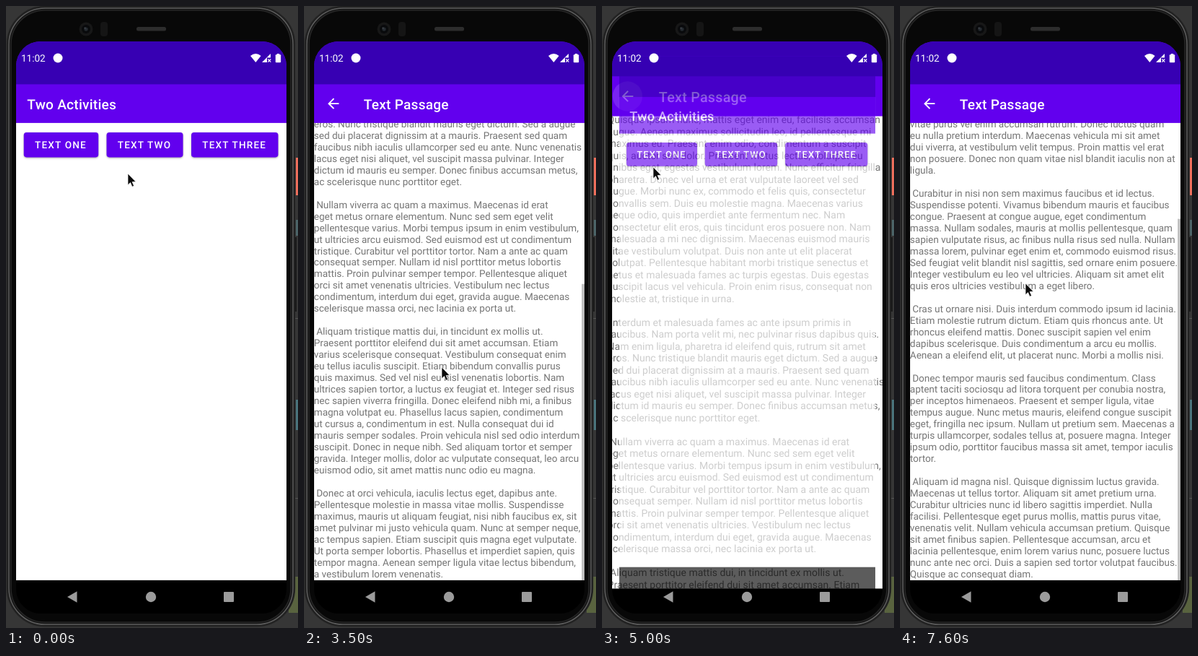
An HTML page with a canvas for the animation above (8 s loop, 405 px wide and 861 px high).

```html
<!DOCTYPE html>
<html lang="en">
<head>
<meta charset="utf-8">
<title>Two Activities</title>
<style>
html, body { margin: 0; width: 100%; height: 100%; overflow: hidden; background: #363636; }
canvas { display: block; width: 405px; height: 861px; }
</style>
</head>
<body>
<canvas id="stage"></canvas>
<script>
const W = 405, H = 861, LOOP = 8000, STEP = 100;
const SCREEN = { x: 14, y: 49, w: 375, h: 792 };
const MID = { x: 201.5, y: 445 };
// Device pixels to stage pixels, and the layout that follows
const PX = 375 / 1080, DP = 2.75 * PX;
const BAR = 108.4, TOP = 161.9, BOTTOM = 794.9;
const SMALL = 39 * PX, LARGE = 55 * PX, LINE = 46 * PX;
const FONT = 'Roboto, "Open Sans", sans-serif';
const DARK = '#3700b3', PURPLE = '#6200ee';

const passageOne = `Lorem ipsum dolor sit amet, consectetur adipiscing elit.
Quisque ipsum nunc, mattis eget enim eu, facilisis accumsan
augue. Aenean maximus sollicitudin leo, id pellentesque mi
maximus eu. Praesent enim odio, condimentum a suscipit
quis, auctor sed dolor. Praesent metus lectus, volutpat eu
finibus eget, egestas vestibulum lorem. Nunc efficitur fringilla
pharetra. Donec vel urna et erat vulputate laoreet vel sed
augue. Morbi nunc ex, commodo et felis quis, consectetur
convallis sem. Duis eu molestie magna. Maecenas varius
neque odio, quis imperdiet ante fermentum nec. Nam
consectetur elit eros, quis tincidunt eros posuere non. Nam
malesuada a mi nec dignissim. Maecenas euismod mauris
vitae vestibulum volutpat. Duis non ante ut elit placerat
volutpat. Pellentesque habitant morbi tristique senectus et
netus et malesuada fames ac turpis egestas. Duis egestas
suscipit lacus vel vehicula. Proin enim risus, consequat non
molestie at, tristique in urna.

 Interdum et malesuada fames ac ante ipsum primis in
faucibus. Nam porta velit mi, nec pulvinar risus dapibus quis.
Nam enim ligula, pharetra id eleifend quis, rutrum sit amet
eros. Nunc tristique blandit mauris eget dictum. Sed a augue
sed dui placerat dignissim at a mauris. Praesent sed quam
faucibus nibh iaculis ullamcorper sed eu ante. Nunc venenatis
lacus eget nisi aliquet, vel suscipit massa pulvinar. Integer
dictum id mauris eu semper. Donec finibus accumsan metus,
ac scelerisque nunc porttitor eget.

 Nullam viverra ac quam a maximus. Maecenas id erat
eget metus ornare elementum. Nunc sed sem eget velit
pellentesque varius. Morbi tempus ipsum in enim vestibulum,
ut ultricies arcu euismod. Sed euismod est ut condimentum
tristique. Curabitur vel porttitor tortor. Nam a ante ac quam
consequat semper. Nullam id nisl porttitor metus lobortis
mattis. Proin pulvinar semper tempor. Pellentesque aliquet
orci sit amet venenatis ultricies. Vestibulum nec lectus
condimentum, interdum dui eget, gravida augue. Maecenas
scelerisque massa orci, nec lacinia ex porta ut.

 Aliquam tristique mattis dui, in tincidunt ex mollis ut.
Praesent porttitor eleifend dui sit amet accumsan. Etiam
varius scelerisque consequat. Vestibulum consequat enim
eu tellus iaculis suscipit. Etiam bibendum convallis purus
quis maximus. Sed vel nisl eu nisl venenatis lobortis. Nam
ultrices sapien tortor, a luctus ex feugiat et. Integer sed risus
nec sapien viverra fringilla. Donec eleifend nibh mi, a finibus
magna volutpat eu. Phasellus lacus sapien, condimentum
ut cursus a, condimentum in est. Nulla consequat dui id
mauris semper sodales. Proin vehicula nisl sed odio interdum
suscipit. Donec in neque nibh. Sed aliquam tortor et semper
gravida. Integer mollis, dolor ac vulputate consequat, leo arcu
euismod odio, sit amet mattis nunc odio eu magna.

 Donec at orci vehicula, iaculis lectus eget, dapibus ante.
Pellentesque molestie in massa vitae mollis. Suspendisse
maximus, mauris ut aliquam feugiat, nisi nibh faucibus ex, sit
amet pulvinar mi justo vehicula quam. Nunc at semper neque,
ac tempus sapien. Etiam suscipit quis magna eget vulputate.
Ut porta semper lobortis. Phasellus et imperdiet sapien, quis
tempor magna. Aenean semper ligula vitae lectus bibendum,
a vestibulum lorem venenatis.`.split('\n');

const passageTwo = `Lorem ipsum dolor sit amet, consectetur adipiscing elit. Sed
ac sem neque. Pellentesque tempus sollicitudin elementum.
Vestibulum eros turpis, varius eu finibus sit amet, aliquet
a nulla. Pellentesque scelerisque metus nec eros faucibus
pulvinar. Phasellus aliquam tincidunt suscipit. Proin
ullamcorper ligula nibh, ac fringilla massa placerat sit amet.
Praesent molestie iaculis libero in egestas. Curabitur vitae
dignissim ligula. Nullam tincidunt eros vitae egestas tincidunt.
Praesent porttitor dolor vitae ligula tincidunt, vitae lobortis
orci viverra. Aenean fermentum malesuada vestibulum. Etiam
vitae purus vel enim accumsan rutrum. Donec luctus quam
eu nulla pretium interdum. Maecenas vehicula mi sit amet
dui viverra, at vestibulum velit tempus. Proin mattis vel erat
non posuere. Donec non quam vitae nisl blandit iaculis non at
ligula.

 Curabitur in nisi non sem maximus faucibus et id lectus.
Suspendisse potenti. Vivamus bibendum mauris et faucibus
congue. Praesent at congue augue, eget condimentum
massa. Nullam sodales, mauris at mollis pellentesque, quam
sapien vulputate risus, ac finibus nulla risus sed nulla. Nullam
massa lorem, pulvinar eget enim et, commodo euismod risus.
Sed feugiat velit blandit nisl sagittis, sed ornare enim posuere.
Integer vestibulum eu leo vel ultricies. Aliquam sit amet elit
quis eros ultricies vestibulum a eget libero.

 Cras ut ornare nisi. Duis interdum commodo ipsum id lacinia.
Etiam molestie rutrum dictum. Etiam quis rhoncus ante. Ut
rhoncus eleifend mattis. Donec suscipit sapien vel enim
dapibus scelerisque. Duis condimentum a arcu eu mollis.
Aenean a eleifend elit, ut placerat nunc. Morbi a mollis nisi.

 Donec tempor mauris sed faucibus condimentum. Class
aptent taciti sociosqu ad litora torquent per conubia nostra,
per inceptos himenaeos. Praesent et semper ligula, vitae
tempus augue. Nunc metus mauris, eleifend congue suscipit
eget, fringilla nec ipsum. Nullam ut pretium sem. Maecenas a
turpis ullamcorper, sodales tellus at, posuere magna. Integer
ipsum odio, porttitor faucibus massa sit amet, tempor iaculis
tortor.

 Aliquam id magna nisl. Quisque dignissim luctus gravida.
Maecenas ut tellus tortor. Aliquam sit amet pretium urna.
Curabitur ultricies nunc id libero sagittis imperdiet. Nulla
facilisi. Pellentesque eget purus mollis, mattis purus vitae,
venenatis velit. Nullam vehicula accumsan pretium. Quisque
sit amet finibus sapien. Pellentesque accumsan, arcu et
lacinia pellentesque, enim lorem varius nunc, posuere luctus
nunc ante nec orci. Duis a sapien sed tortor volutpat faucibus.
Quisque ac consequat diam.`.split('\n');

const cursorPath = [
  [0, 168, 231], [300, 158, 262], [700, 111, 226], [800, 111, 226], [1100, 78, 192],
  [1900, 78, 192], [2300, 46, 129], [2400, 49, 336], [2700, 49, 336], [2800, 21, 455],
  [3100, 150, 735], [3600, 200, 440], [3800, 206, 449], [4000, 206, 400], [4300, 190, 700],
  [4500, 37, 126], [4900, 37, 126], [5000, 70, 222], [5700, 70, 222], [5800, 185, 192],
  [6000, 185, 192], [6100, 19, 425], [6300, 19, 425], [6800, 87, 433], [7200, 123, 595],
  [7300, 135, 510], [7500, 135, 510], [7600, 173, 383]
];

// Linear value along [time, ...values] keys
function track(keys, t, i = 1) {
  let a = keys[0];
  for (const b of keys) {
    if (t < b[0]) return a[i] + (b[i] - a[i]) * (t - a[0]) / (b[0] - a[0]);
    a = b;
  }
  return a[i];
}

const dpr = window.devicePixelRatio || 1;
const canvas = document.getElementById('stage');
const layer = document.createElement('canvas');
for (const c of [canvas, layer]) { c.width = W * dpr; c.height = H * dpr; }
const main = canvas.getContext('2d'), over = layer.getContext('2d');

function rect(g, x, y, w, h, color) { g.fillStyle = color; g.fillRect(x, y, w, h); }

function round(g, x, y, w, h, r) { g.beginPath(); g.roundRect(x, y, w, h, r); }

function disc(g, x, y, r, color) {
  g.beginPath();
  g.arc(x, y, r, 0, 7);
  g.fillStyle = color;
  g.fill();
}

function poly(g, points, color) {
  g.beginPath();
  for (let i = 0; i < points.length; i += 2) g.lineTo(points[i], points[i + 1]);
  g.closePath();
  g.fillStyle = color;
  g.fill();
}

function text(g, s, x, y, size, color, weight = 400, spacing = 0) {
  g.font = `${weight} ${size}px ${FONT}`;
  g.textRendering = 'geometricPrecision';
  g.letterSpacing = spacing * size + 'px';
  g.fillStyle = color;
  g.fillText(s, x, y);
}

function chrome(g, title, x) {
  rect(g, 14, 49, 375, TOP - 49, PURPLE);
  rect(g, 14, 49, 375, BAR - 49, DARK);
  rect(g, 14, BOTTOM, 375, 47, '#000');
  text(g, title, x, 142.8, LARGE, '#fff', 500, .0125);
}

function page(g) { rect(g, 14, BAR, 375, BOTTOM + 1 - BAR, '#fff'); }

function button(g, label, x, w, press) {
  g.save();
  g.shadowColor = 'rgba(0,0,0,.35)';
  g.shadowBlur = 2.5 * dpr;
  g.shadowOffsetY = 1 * dpr;
  round(g, x, 175, w, 34.4, 3.8);
  g.fillStyle = PURPLE;
  g.fill();
  g.restore();
  if (press > 0) {
    g.save();
    round(g, x, 175, w, 34.4, 3.8);
    g.clip();
    disc(g, 78, 192, 20 + 60 * press, 'rgba(255,255,255,.24)');
    g.restore();
  }
  text(g, label, x + 16 * DP, 197.3, SMALL, '#fff', 500, .0893);
}

function home(g, t) {
  page(g);
  chrome(g, 'Two Activities', 14 + 16 * DP);
  button(g, 'TEXT ONE', 24.7, 103.5, t >= 1500 && t < 2300 ? (t - 1400) / 300 : 0);
  button(g, 'TEXT TWO', 139.5, 106, 0);
  button(g, 'TEXT THREE', 257, 120.5, 0);
}

function backArrow(g) {
  g.save();
  g.translate(14 + 16 * DP, 123.7);
  g.scale(DP, DP);
  poly(g, [20, 11, 7.83, 11, 13.42, 5.41, 12, 4, 4, 12, 12, 20, 13.41, 18.59, 7.83, 13, 20, 13], '#fff');
  g.restore();
}

function passage(g, lines, scroll, max, glow, pressed) {
  const view = BOTTOM - TOP;
  page(g);
  lines.forEach((line, i) => {
    const y = TOP + 14.5 + i * LINE - scroll;
    if (y > TOP - 8 && y < BOTTOM + 14) text(g, line, 13.8, y, SMALL, '#757575');
  });
  const bar = view / (view + max);
  rect(g, 389 - 4 * DP, TOP + scroll * bar, 4 * DP, view * bar, 'rgba(0,0,0,.25)');
  if (glow > 0) {
    g.beginPath();
    g.ellipse(201, BOTTOM + 55, 275, 108 * (.5 + glow / 2), 0, 0, 7);
    g.fillStyle = `rgba(98,0,238,${.15 * glow})`;
    g.fill();
  }
  chrome(g, 'Text Passage', 14 + 72 * DP);
  if (pressed) disc(g, 40.7, 135.2, 20, 'rgba(255,255,255,.14)');
  backArrow(g);
}

function zoom(g, s) {
  g.translate(MID.x, MID.y);
  g.scale(s, s);
  g.translate(-MID.x, -MID.y);
}

// Lower window grows while the upper one scales and fades in
function stack(lower, grow, upper, scale, alpha) {
  main.save();
  zoom(main, grow);
  lower(main);
  main.restore();
  if (alpha <= 0) return;
  over.setTransform(dpr, 0, 0, dpr, 0, 0);
  over.clearRect(0, 0, W, H);
  zoom(over, scale);
  over.save();
  over.beginPath();
  over.rect(SCREEN.x, SCREEN.y, SCREEN.w, SCREEN.h);
  over.clip();
  upper(over);
  over.restore();
  main.globalAlpha = alpha;
  main.drawImage(layer, 0, 0, W, H);
  main.globalAlpha = 1;
}

function windows(t) {
  const first = g => passage(g, passageOne,
    track([[0, 0], [2900, 0], [3500, 344], [3900, 344], [4300, 21]], t), 344,
    track([[0, 0], [3600, 0], [3800, 1], [4100, 0]], t), t >= 5000);
  const second = g => passage(g, passageTwo,
    track([[0, 0], [7200, 0], [7300, 80], [7500, 80], [7600, 168]], t), 168, 0, false);
  const start = g => home(g, t);
  if (t < 1700) start(main);
  else if (t < 2200) {
    stack(start, track([[1700, 1], [1800, 1.015], [1900, 1.034], [2100, 1.048]], t),
      first, track([[1700, .85], [1800, .92], [1900, .966], [2000, .985], [2200, 1]], t),
      track([[1700, 0], [1800, .6], [1900, .98], [2000, 1]], t));
  } else if (t < 5000) first(main);
  else if (t < 5800) stack(first, 1.033, start, .948, .64);
  else if (t < 6100) stack(start, 1.046, second, .985, 1);
  else second(main);
}

function desk(g) {
  rect(g, 0, 0, W, H, '#363636');
  rect(g, 402, 210, 3, 52, '#ee6f5c');
  rect(g, 402, 296, 3, 22, '#4c6468');
  rect(g, 402, 545, 3, 42, '#4a747c');
  rect(g, 401, 432, 4, 1, '#555');
  rect(g, 401, 681, 4, 1, '#555');
  rect(g, 392, 790, 13, 50, '#59633f');
}

function phone(g) {
  rect(g, 399, 320, 4, 103, '#161616');
  const rims = [[1.5, '#1c1c1c', '#242424'], [4, '#161616', '#5e5e5e'], [7, '#080808', '#262626']];
  for (const [d, fill, edge] of rims) {
    round(g, d, d - 1, 402 - 2 * d, 861 - 2 * d, 54 - d);
    g.fillStyle = fill;
    g.fill();
    g.strokeStyle = edge;
    g.lineWidth = 1.5;
    g.stroke();
  }
  disc(g, 111, 32, 9.5, '#171717');
  disc(g, 111, 32, 6, '#090a0c');
  disc(g, 111, 32, 2.6, '#252a30');
  disc(g, 109.5, 30.5, 1, '#4a5056');
  round(g, 131, 22, 10, 20, 4);
  g.fillStyle = '#151515';
  g.fill();
  round(g, 181, 29, 41, 5.5, 2.5);
  g.fillStyle = '#2d2d2d';
  g.fill();
}

function system(g) {
  text(g, '11:02', 21, 77, SMALL, '#fff');
  disc(g, 72, 72, 6.5, '#fff');
  g.beginPath();
  g.moveTo(346.3, 78);
  g.lineTo(339, 69);
  g.quadraticCurveTo(346.3, 63, 353.6, 69);
  g.fillStyle = '#fff';
  g.fill();
  poly(g, [355, 78, 367, 66, 367, 71.5, 362, 71.5, 362, 78], '#fff');
  g.strokeStyle = '#fff';
  g.lineWidth = 1.2;
  g.beginPath();
  g.moveTo(363.3, 73.5); g.lineTo(367.3, 77.7);
  g.moveTo(367.3, 73.5); g.lineTo(363.3, 77.7);
  g.stroke();
  round(g, 373.8, 67.2, 7.4, 11, 1);
  g.fill();
  rect(g, 375.8, 66, 3.4, 2, '#fff');
  const grey = '#9b9b9b';
  poly(g, [85, 818, 98.5, 810.3, 98.5, 825.7], grey);
  disc(g, 201, 818, 7.2, grey);
  round(g, 302, 811, 14, 14, 1);
  g.fillStyle = grey;
  g.fill();
}

function pointer(g, x, y) {
  g.save();
  g.translate(x + .5, y + .5);
  g.lineJoin = 'round';
  poly(g, [.5, .5, .5, 16.2, 4, 13, 6.5, 18.7, 9, 17.6, 6.6, 12, 11.5, 11.8], '#0c0c0c');
  g.strokeStyle = 'rgba(255,255,255,.75)';
  g.lineWidth = .9;
  g.stroke();
  g.restore();
}

function draw(t) {
  const g = main;
  g.setTransform(dpr, 0, 0, dpr, 0, 0);
  desk(g);
  phone(g);
  g.save();
  round(g, SCREEN.x, SCREEN.y, SCREEN.w, SCREEN.h, 34);
  g.clip();
  windows(t);
  system(g);
  g.restore();
  pointer(g, track(cursorPath, t, 1), track(cursorPath, t, 2));
}

const begin = performance.now();
function tick() {
  const t = (performance.now() - begin) % LOOP;
  draw(Math.floor(t / STEP) * STEP);
  requestAnimationFrame(tick);
}
tick();
</script>
</body>
</html>
```
